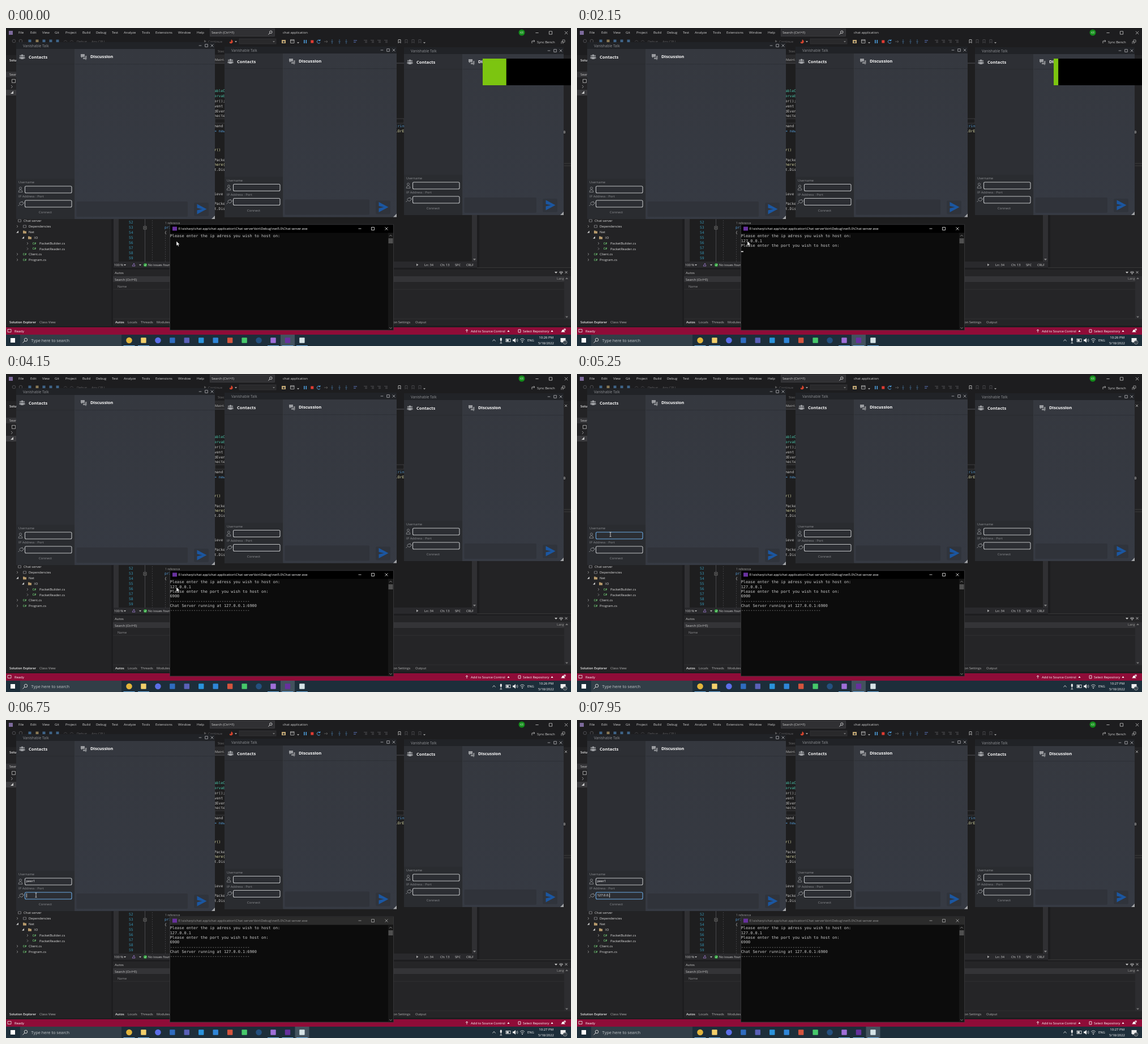
Animation, 998 px wide and 561 px high, one loop 8000 ms. Source, as an HTML page:

```html
<!DOCTYPE html>
<html lang="en">
<head>
<meta charset="utf-8">
<title>Chat server demo</title>
<style>
html, body { margin: 0; width: 100%; height: 100%; overflow: hidden; background: #1d1d1f; }
svg { display: block; width: 100vw; height: 100vh; }
text { font-family: "Open Sans", "Noto Sans", sans-serif; white-space: pre; }
.mono { font-family: "DejaVu Sans Mono", "Liberation Mono", monospace; }
</style>
</head>
<body>
<svg id="stage" viewBox="0 0 998 561"></svg>
<script>
const LOOP = 8000;
const stage = document.getElementById('stage');

// y is the vertical centre of the text
const rect = (x, y, w, h, fill, more = '') =>
  `<rect x="${x}" y="${y}" width="${w}" height="${h}" fill="${fill}" ${more}/>`;
const text = (x, y, str, size = 5.95, fill = '#d4d4d4', more = '') =>
  `<text x="${x}" y="${(y + size * 0.36).toFixed(2)}" font-size="${size}" fill="${fill}" ${more}>${str}</text>`;
const code = (x, y, str, fill = '#c8c8c8', size = 6.33) => text(x, y, str, size, fill, 'class="mono"');
const line = (d, stroke, width = 0.8, more = '') =>
  `<path d="${d}" fill="none" stroke="${stroke}" stroke-width="${width}" ${more}/>`;
const shape = (d, fill, more = '') => `<path d="${d}" fill="${fill}" ${more}/>`;
const disc = (x, y, r, fill, more = '') => `<circle cx="${x}" cy="${y}" r="${r}" fill="${fill}" ${more}/>`;
const lens = (x, y, s, c) =>
  `<circle cx="${x + s * 0.2}" cy="${y - s * 0.2}" r="${s * 0.55}" fill="none" stroke="${c}" stroke-width=".9"/>` +
  line(`M${x - s * 0.2} ${y + s * 0.2}l${-s * 0.7} ${s * 0.7}`, c, 1);
const windowButtons = (xs, y, s, c, more = '') =>
  line(`M${xs[0] - s} ${y}h${2 * s}M${xs[1] - s} ${y - s}h${2 * s}v${2 * s}h${-2 * s}z` +
    `M${xs[2] - s} ${y - s}l${2 * s} ${2 * s}m0 ${-2 * s}l${-2 * s} ${2 * s}`, c, 0.8, more);

function ideTop() {
  let s = rect(0, 0, 998, 561, '#1d1d1f');
  s += rect(5, 5, 7, 7, '#7d6a9c');
  const menu = { File: 22, Edit: 43, View: 64, Git: 86, Project: 105, Build: 135, Debug: 159, Test: 187,
    Analyze: 208, Tools: 240, Extensions: 264, Window: 304, Help: 337 };
  for (const name in menu) s += text(menu[name], 8, name);
  s += rect(360.5, 1.5, 114, 13, '#303033', 'stroke="#48484b" stroke-width=".6"');
  s += text(363, 8, 'Search (Ctrl+F)') + lens(467, 8, 4, '#ddd') + text(489, 8, 'chat application');
  s += disc(911, 8, 5.5, '#148c1b') + text(911, 8.2, 'KR', 5, '#c9e6c9', 'text-anchor="middle"');
  s += windowButtons([938, 962, 989.5], 8.5, 2.6, '#ccc');

  // toolbar
  for (const x of [14, 26]) s += `<circle cx="${x}" cy="23" r="2.8" fill="none" stroke="#5a5a5d" stroke-width=".8"/>`;
  [42, 55, 67, 79, 91].forEach((x, i) =>
    s += rect(x - 2.5, 20.5, 5, 5, i === 1 ? '#8b7a55' : '#3f6488'));
  s += line('M102 24q3-4 6 0M113 24q3-4 6 0', '#4a4a4d');
  s += text(125, 23.5, 'Debug', 5.9, '#606063') + text(151, 23.5, 'Any CPU', 5.9, '#606063');
  s += text(357, 23.5, 'Continue', 5.9, '#606063') + shape('M350 21l4 2.5l-4 2.5z', '#555');
  s += shape('M398 20q5 4 1 7q-5 1-4-3l2 1z', '#d8452e') + shape('M404 23h4l-2 2.4z', '#aaa');
  s += rect(412, 19, 65, 9, '#29292b', 'stroke="#3a3a3c" stroke-width=".6"') + shape('M471 23h4l-2 2.4z', '#777');
  s += rect(487, 21, 7, 6, '#c3a873') + rect(489, 23, 3, 3, '#444');
  s += line('M502.5 20.5h6.5v6h-6.5zm0 2h6.5', '#c4c4c4') + shape('M514 25h4l-2 2.4z', '#aaa');
  s += rect(526, 21, 1.6, 6, '#4d9fdd') + rect(529.5, 21, 1.6, 6, '#4d9fdd') + rect(538.3, 21.5, 5, 5, '#e03c33');
  s += line('M554.5 22a3 3 0 1 0 .5 3.5m-.2-5.5v2.5h-2.5', '#4d9fdd', 1);
  s += line('M562 24h6l-2-2m2 2l-2 2', '#666');
  for (const x of [576, 589, 601]) s += line(`M${x} 20v5m-1.5-1.5l1.5 2l1.5-2`, '#446f96') + disc(x, 27, 0.8, '#446f96');
  s += line('M614 22h6M614 25h4', '#5a74ba', 1);
  for (const x of [635, 647, 659, 671]) s += line(`M${x - 3} 21.5h6m-4 2h4m-4 2h4`, '#555558');
  for (const x of [695, 707, 719, 731])
    s += line(`M${x - 2} 20.5h4v6l-2-2l-2 2z`, x < 700 ? '#d0d0d0' : '#505053');
  s += shape('M737 25h4l-2 2.4z', '#999');
  s += line('M929 27v-4h4m-1-2l2 2l-2 2', '#ccc') + text(938, 25, 'Sync Bench');
  s += line('M981 28v-4h3m0 4v-4m-1-3h4v4h-4z', '#aaa');
  return s;
}

function ideBody() {
  let s = rect(0, 48, 186, 478, '#232325') + rect(190, 62, 642, 361, '#1e1e1f') + rect(836, 48, 162, 375, '#232325');
  s += rect(190, 61, 642, 2, '#37373a');
  s += text(6, 57, 'Solution Explorer', 5.95, '#eee', 'font-weight="600"');
  s += rect(0, 77, 186, 10, '#343437') + text(6, 82, 'Search Solution Explorer', 5.95, '#ccc');
  s += line('M10.5 90.5h6v6h-6z', '#bbb') + line('M9 101l2.5 2.5l-2.5 2.5', '#aaa');
  s += rect(0, 109, 186, 10, '#3b3b3e') + shape('M8 116h5v-5z', '#ccc');

  const arrow = (x, y, open) => open ? shape(`M${x - 2} ${y + 1.5}h4v-4z`, '#ccc')
    : line(`M${x - 1} ${y - 2}l2 2l-2 2`, '#aaa', 0.7);
  const folder = (x, y) => shape(`M${x - 3} ${y - 2.5}h2.5l1 1h2.5v4h-6z`, '#b89b6c');
  const file = (x, y) => text(x, y, 'C#', 5, '#6cc070', 'text-anchor="middle" font-weight="700"');
  const sq = (x, y) => line(`M${x - 2.5} ${y - 2}h5v4h-5z`, '#8a8a8d');
  const rows = [
    ['Chat server', 31, 340, 24, sq, null], ['Dependencies', 40, 350, 33, sq, false],
    ['Net', 40, 360, 33, folder, true], ['IO', 50, 370, 42, folder, true],
    ['PacketBuilder.cs', 59, 380, 50, file, false], ['PacketReader.cs', 59, 389.5, 50, file, false],
    ['Client.cs', 40, 399, 33, file, false], ['Program.cs', 40, 409, 33, file, false]];
  for (const [name, x, y, ix, icon, open] of rows) {
    s += text(x, y, name, 5.95, '#ddd') + icon(ix, y);
    if (open !== null) s += arrow(ix < 40 ? 20 : ix - 12, y, open);
  }
  s += text(6, 519, 'Solution Explorer', 5.7, '#eee', 'font-weight="600"') + text(59, 519, 'Class View', 5.95, '#b5b5b5');

  // editor text between the chat windows
  s += rect(369, 47, 20, 14, '#29292b') + text(369, 55.5, 'Main\\', 5.95, '#bbb') + text(374, 41, 'Stack', 5.95, '#777');
  const teal = '#4ec9b0', pale = '#c8c8c8', gold = '#dcdcaa';
  const snips = [['ableO', 111, teal], ['ervab', 120, teal], ['er();', 128.5, pale], ['vent ', 137.5, pale],
    ['dEven', 146.5, pale], ['necte', 155, pale], ['mand ', 173, pale], ['= new', 181.5, '#569cd6'], ['r()', 215, gold],
    ['Packe', 232.5, pale], ['here(', 241, gold], ['t.Dis', 250, pale], ['ieve', 293, pale],
    ['Packe', 310, pale], ['t.Dis', 319, pale]];
  for (const [str, y, c] of snips) s += code(368, y, str, c);
  s += rect(369, 160, 334, 8, '#1e1e1f', 'stroke="#454548" stroke-width=".8"');
  s += code(688, 173, 'trin', '#569cd6') + code(688, 181.5, 'lOrE', gold) + code(984.5, 184, '0');
  s += rect(190, 62, 9, 350, '#303033');
  for (let n = 52; n < 60; n++) s += code(217, 352 + (n - 53) * 8.95, n, '#3592b0');
  s += line('M245.5 335v77', '#66666a', 0.6) + rect(243, 350, 5, 5, '#1e1e1f', 'stroke="#999" stroke-width=".6"') +
    line('M244 352.5h3', '#bbb', 0.6);
  s += line('M258.5 335v77M281.5 366v46', '#55555a', 0.6, 'stroke-dasharray="2 2"');
  s += text(281, 344.5, '1 reference', 5, '#9a9a9a') + code(280, 352, 'pri', '#569cd6') + code(280, 361, '{');

  // editor footer
  s += rect(190, 412, 642, 11, '#29292c') + text(191, 418, '100 %', 5.7) + shape('M208 417h4l-2 2.4z', '#bbb');
  s += line('M223 420l3-5l2 5z', '#9d79d0') + shape('M235 417h4l-2 2.4z', '#bbb');
  s += disc(246, 418, 3, '#38a845') + line('M244.5 418l1.2 1.2l2-2.4', '#fff', 0.7) + text(251, 418, 'No issues found', 5.6);
  s += shape('M725 415.5l3.5 2.3l-3.5 2.3z', '#aaa') + rect(823, 330, 9, 82, '#303033') + shape('M825 407h5l-2.5 3z', '#888');
  [['Ln: 34', 739], ['Ch: 13', 767], ['SPC', 793], ['CRLF', 813]].forEach(([str, x]) => s += text(x, 418, str, 5.7));

  // debugger panes
  s += rect(189, 426, 809, 99, '#252527') + text(192, 432, 'Autos', 5.95, '#ccc');
  s += rect(189, 438, 809, 10, '#343437') + text(192, 443.5, 'Search (Ctrl+E)', 5.8, '#ccc') +
    text(973, 442, 'Lang', 5.7, '#999');
  s += text(197, 455.5, 'Name', 5.8, '#909093') + line('M189 461h797M189 513h809', '#343437', 0.7);
  s += rect(986, 438, 12, 75, '#2d2d30') + shape('M988 443l2.5-3l2.5 3zM988 508.5h5l-2.5 3z', '#777');
  s += shape('M969 430h5l-2.5 3z', '#ccc') + line('M978 430h5v2h-5zm2.5 2v3M987.5 429l4 4m0-4l-4 4', '#ccc');
  s += line('M985.5 239h13M985.5 243h13M832 423h166', '#444', 0.8) + line('M987 54l4 4m0-4l-4 4', '#bbb');
  [['Locals', 215], ['Threads', 238], ['Modules', 266], ['Exception Settings', 665], ['Output', 723]]
    .forEach(([str, x]) => s += text(x, 519, str, 5.8, '#b5b5b5'));
  s += text(193, 519, 'Autos', 5.7, '#eee', 'font-weight="600"');

  // status bar
  s += rect(0, 528, 998, 13, '#8f0c38') + line('M3 531.5h6v5h-6z', '#eee') + text(15, 534.5, 'Ready', 5.95, '#fff');
  s += line('M814 537v-5m-2 2l2-2.2l2 2.2', '#fff') + text(821, 534.5, 'Add to Source Control', 5.95, '#fff') +
    shape('M885.5 536h4l-2-3z', '#fff');
  s += line('M905 532h4v5h-4z', '#fff') + text(913, 534.5, 'Select Repository', 5.8, '#fff') + shape('M962.5 536h4l-2-3z', '#fff');
  return s + shape('M980 536.5q2-1 2-3a2.2 2.2 0 0 1 4 0q0 2 2 3z', '#fff') + disc(987, 532, 2, '#d9b3c1');
}

function chat(x, y, right, bottom, id) {
  const px = x + 103, dim = '#8e9094';
  let s = rect(x, y, right - x, bottom - y, '#36393f') + rect(x, y, right - x, 12, '#212327');
  s += rect(x, y + 12, 103, bottom - y - 12, '#2d2f34') + rect(px + 1, y + 12, right - px - 1, bottom - y - 12, 'url(#pane)');
  s += rect(x, y + 38, 103, 1.2, '#292b2f') + rect(px + 1, y + 38, right - px - 1, 1.2, '#2e3137');
  s += rect(x, bottom - 71, 103, 71, '#2a2c30');
  s += text(x + 12, y + 6.3, 'Vanishable Talk', 6.4, dim) + windowButtons([right - 26, right - 15, right - 5], y + 6, 2.3, '#b5b7ba');
  // people
  const cx = x + 10.5, cy = y + 26;
  for (const dx of [-3.2, 3.2]) s += disc(cx + dx, cy - 2, 1.5, '#85878b') + rect(cx + dx - 2, cy, 4, 3.2, '#85878b', 'rx="1.2"');
  s += disc(cx, cy - 2.6, 1.9, '#a0a2a6') + rect(cx - 2.7, cy - 0.2, 5.4, 4.2, '#a0a2a6', 'rx="1.6"');
  s += text(x + 22, y + 26.2, 'Contacts', 7.6, '#f2f2f2', 'font-weight="700"');
  // speech bubbles
  s += shape(`M${x + 114} ${y + 21}h7v5h-4l-2 2v-2h-1z`, '#9a9ca0') +
    shape(`M${x + 118} ${y + 27}h4v-3h2.5v6h-1v2l-2-2h-3.5z`, '#85878b');
  s += text(x + 131, y + 25.3, 'Discussion', 7.6, '#fff', 'font-weight="700"');
  s += text(x + 4, bottom - 65, 'Username', 5.8, dim) + text(x + 4, bottom - 40, 'IP Address : Port', 5.85, dim);
  [52, 27].forEach((up, i) => s += rect(x + 15.5, bottom - up - 6, 82.5, 12, '#2c2e33',
    `id="${id}${i}" rx="2" stroke="#c0c2c4" stroke-width="1.1"`));
  const ix = x + 7.5, iy = bottom - 52;
  s += line(`M${ix - 3.5} ${iy + 4.5}q0-4 3.5-4t3.5 4zM${ix - 2} ${iy - 2.5}a2 2 0 0 1 4 0a2 2 0 0 1-4 0z`, '#85878b', 0.9);
  s += line(`M${ix - 4} ${iy + 29}l2.5-2.5m-.5-2l3 3l3-1l1.5-3l-3-2l-3 1zm4.5-2l1.5-2m1 4l2-1.5`, '#85878b', 1);
  s += text(x + 51.5, bottom - 12, 'Connect', 6.1, dim, 'text-anchor="middle"');
  s += rect(px + 3.5, bottom - 31, right - 48 - px - 3.5, 27, '#30333a', 'rx="2"');
  s += rect(right - 37, bottom - 29, 26, 24, '#30343c', 'rx="3"');
  s += `<g transform="translate(${right - 23.5} ${bottom - 17.5})">` +
    shape('M-8-9L9 0L-8 9V2L1 0L-8-2Z', '#1b56a0') + '</g>';
  return s + shape(`M${right} ${bottom}h-6l6-6z`, '#a4a6a9');
}

function taskbar() {
  let s = rect(0, 541, 998, 20, '#1d2e3a') + rect(8, 547, 8, 8, '#fff');
  s += rect(25, 541, 179, 20, '#323e47') + lens(34, 551, 5, '#ddd') + text(44.5, 551, 'Type here to search', 7.4, '#c5c9cc');
  s += rect(485, 541, 25, 20, '#43525e', 'id="activeTask"');
  // neutral app tiles, 's' square or 'c' circle
  const tiles = [['c', '#e2b53c'], ['s', '#f2cf6b'], ['c', '#5b6ee8'], ['s', '#2f6cc0'], ['s', '#5a60b8'], ['s', '#2a93dc'],
    ['s', '#2f86d8'], ['s', '#d4543e'], ['s', '#46c96a'], ['c', '#24507f'], ['s', '#a06fd8'], ['s', '#68319f'], ['s', '#d6e3e6']];
  tiles.forEach(([kind, c], i) => {
    const x = 217.5 + i * 25.45;
    s += kind === 'c' ? disc(x, 551, 5.3, c) : rect(x - 4.7, 546.3, 9.4, 9.4, c, 'rx="1"');
    if ([0, 1, 10, 11, 12].includes(i)) s += rect(x - 10, 560, 20, 1, '#76b9ed');
  });
  s += line('M859.5 552.5l2.5-3l2.5 3', '#eee') + rect(872.8, 546.5, 3, 5.5, '#eee', 'rx="1.5"') + line('M874.3 552v4m-2 0h4', '#eee');
  s += rect(883, 548.5, 8, 5, 'none', 'stroke="#eee" stroke-width=".8"') + rect(884, 549.5, 4, 3, '#eee');
  s += shape('M895 549.5h2l3-2.5v8l-3-2.5h-2z', '#eee') + line('M901.5 549q1.5 2 0 4M903 548q2.5 3 0 6', '#eee', 0.6);
  s += line('M908 550q4-4 8 0M909.5 552q2.5-2.5 5 0', '#eee') + disc(912, 554, 0.9, '#eee');
  s += text(921, 551, 'ENG', 5.8, '#fff');
  s += text(967, 546.3, '', 5.95, '#fff', 'id="clock" text-anchor="end"') + text(968, 555.5, '5/18/2022', 5.95, '#fff', 'text-anchor="end"');
  s += shape('M979.5 547h9v7h-5l-2 2v-2h-2z', '#eee') + disc(987.5, 554.5, 3.3, '#26333d', 'stroke="#ddd" stroke-width=".6"') +
    text(987.5, 554.5, '1', 4.5, '#fff', 'text-anchor="middle"');
  return s;
}

const ROW = 8.37, CELL = 4.149, TOP = 366.7;
function consoleWindow() {
  let s = rect(289.5, 347, 395, 186, '#0c0c0c', 'stroke="#3d3d40" stroke-width=".8"');
  s += rect(290, 347.4, 394, 14, '#000', 'id="bar"') + rect(294, 350.5, 8, 7, '#68319f');
  s += text(304.5, 354.3, 'E:\\sisharp\\chat app\\chat application\\Chat server\\bin\\Debug\\net5.0\\Chat server.exe', 5.92, '#fff', 'id="barText"');
  s += windowButtons([625, 648, 672], 354, 2.5, '#eee', 'id="barButtons"');
  s += rect(675, 361.4, 9, 171.3, '#181818') + rect(675.5, 371, 8, 9, '#4f4f4f');
  s += line('M677.3 367.5l2.2-2.4l2.2 2.4M677.3 528l2.2 2.4l2.2-2.4', '#999');
  for (let i = 0; i < 7; i++) s += text(289.7, TOP + i * ROW, '', 6.89, '#ccc', `class="mono" id="row${i}"`);
  return s + rect(290, 0, 4, 1.6, '#f0f0f0', 'id="block"');
}

function overlay() {
  const field = y => text(35.5, y, '', 5.85, '#fff', `id="typed${y}"`);
  return field(284) + field(309) + rect(0, 0, 0.7, 7.5, '#fff', 'id="caret"') +
    '<g id="notice">' + rect(0, 54, 156, 47, '#7cc510', 'id="green"') + rect(0, 54, 156, 47, '#000', 'id="black"') +
    '<g id="noticeText">' + disc(867.5, 78, 8.5, '#7cc510') + text(890, 78.5, 'Recording has started', 7.85, '#f0f0f0') + '</g></g>' +
    '<g id="arrow">' + shape('M0 0v8.2l2-1.8l1.3 2.9l1.3-.6l-1.3-2.7h2.5z', '#fff', 'stroke="#000" stroke-width=".4"') + '</g>' +
    '<g id="beam">' + line('M-1.5-4q1.5 0 1.5 1q0-1 1.5-1M0-3v6M-1.5 4q1.5 0 1.5-1q0 1 1.5 1', '#e8e8e8', 0.8) + '</g>';
}

stage.innerHTML = '<defs><linearGradient id="pane" x1="0" y1="0" x2="0" y2="1"><stop offset="0" stop-color="#35383f"/>' +
  '<stop offset="1" stop-color="#363a43"/></linearGradient></defs>' +
  ideTop() + ideBody() + chat(18, 25, 369, 337, 'a') + chat(386, 33, 690, 333.5, 'b') + chat(703, 34, 985, 330, 'c') +
  taskbar() + consoleWindow() + overlay();

const el = {};
stage.querySelectorAll('[id]').forEach(e => el[e.id] = e);
const set = (id, name, value) => el[id].setAttribute(name, value);
const show = (id, on) => set(id, 'visibility', on ? 'visible' : 'hidden');
const put = (id, str) => { if (el[id].textContent !== str) el[id].textContent = str; };
const ramp = (t, a, b) => Math.min(1, Math.max(0, (t - a) / (b - a)));
const smooth = k => k * k * (3 - 2 * k);
const mix = (a, b, k) => a + (b - a) * k;
const typed = (str, t, start, step) => str.slice(0, Math.max(0, Math.floor((t - start) / step) + 1));

const path = [[4300, 301, 376], [4700, 205, 352], [5000, 68, 310], [5100, 64, 306], [5200, 59, 283], [6350, 59, 283], [6600, 53, 309]];
function pointer(t) {
  const i = path.findIndex(p => p[0] > t);
  if (i === 0) return path[0].slice(1);
  if (i < 0) return path[path.length - 1].slice(1);
  const [p, q] = [path[i - 1], path[i]], k = smooth(ramp(t, p[0], q[0]));
  return [mix(p[1], q[1], k), mix(p[2], q[2], k)];
}

const CLICK_1 = 5450, CLICK_2 = 6650, ENTER_IP = 1900, ENTER_PORT = 3550;
function draw(t) {
  // recording notice: black slides in over green, both slide out again
  show('notice', t < 2550);
  set('green', 'x', mix(842, 998, smooth(ramp(t, 2300, 2550))));
  set('black', 'x', mix(mix(884, 844, ramp(t, 0, 150)), 998, smooth(ramp(t, 2115, 2415))));
  set('noticeText', 'opacity', ramp(t, 200, 450) * (1 - ramp(t, 1900, 2100)));

  // console
  const rule = '-'.repeat(34);
  const rows = ['Please enter the ip adress you wish to host on:', typed('127.0.0.1', t, 950, 90)];
  if (t >= ENTER_IP) rows.push('Please enter the port you wish to host on:', typed('6900', t, 2600, 140));
  if (t >= ENTER_PORT) rows.push(rule, 'Chat Server running at 127.0.0.1:6900', rule);
  for (let i = 0; i < 7; i++) put('row' + i, rows[i] || '');
  const last = rows.length - 1;
  show('block', t >= 580 && t < ENTER_PORT && (t - 580) % 1060 < 530);
  set('block', 'x', 289.8 + rows[last].length * CELL);
  set('block', 'y', TOP + last * ROW + 1.8);
  const active = t < CLICK_1;
  set('bar', 'fill', active ? '#000' : '#2b2b2b');
  set('barText', 'fill', active ? '#fff' : '#999');
  set('barButtons', 'stroke', active ? '#eee' : '#aaa');
  set('activeTask', 'x', active ? 485 : 510.5);
  put('clock', t < 4700 ? '10:26 PM' : '10:27 PM');

  // form
  put('typed284', typed('peer1', t, 5700, 110));
  put('typed309', typed('127.0.0.', t, 7050, 115));
  const [x, y] = pointer(t);
  const hidden = (t >= 5700 && t < 6350) || t >= 7050;
  const over = mid => !hidden && x > 33 && x < 116 && Math.abs(y - mid) < 6.5;
  const second = t >= CLICK_2;
  const edge = on => on ? '#6aa9e4' : '#c0c2c4';
  set('a0', 'stroke', edge(over(285) || (!active && !second)));
  set('a1', 'stroke', edge(over(310) || second));
  const focus = second ? 'typed309' : 'typed284';
  const idle = second ? t - Math.max(CLICK_2, t >= 7050 ? 7855 : 0) : t - Math.max(CLICK_1, t >= 5700 ? 6140 : 0);
  show('caret', !active && (idle < 0 || idle % 1060 < 530));
  set('caret', 'x', 36 + el[focus].getComputedTextLength());
  set('caret', 'y', second ? 305.7 : 280.7);

  const beam = over(285) || over(310);
  show('beam', beam);
  show('arrow', !beam && !hidden);
  const at = `translate(${x.toFixed(2)} ${y.toFixed(2)})`;
  set('beam', 'transform', at);
  set('arrow', 'transform', at);
}

const start = performance.now();
function tick() {
  draw((performance.now() - start) % LOOP);
  requestAnimationFrame(tick);
}
tick();
</script>
</body>
</html>
```
